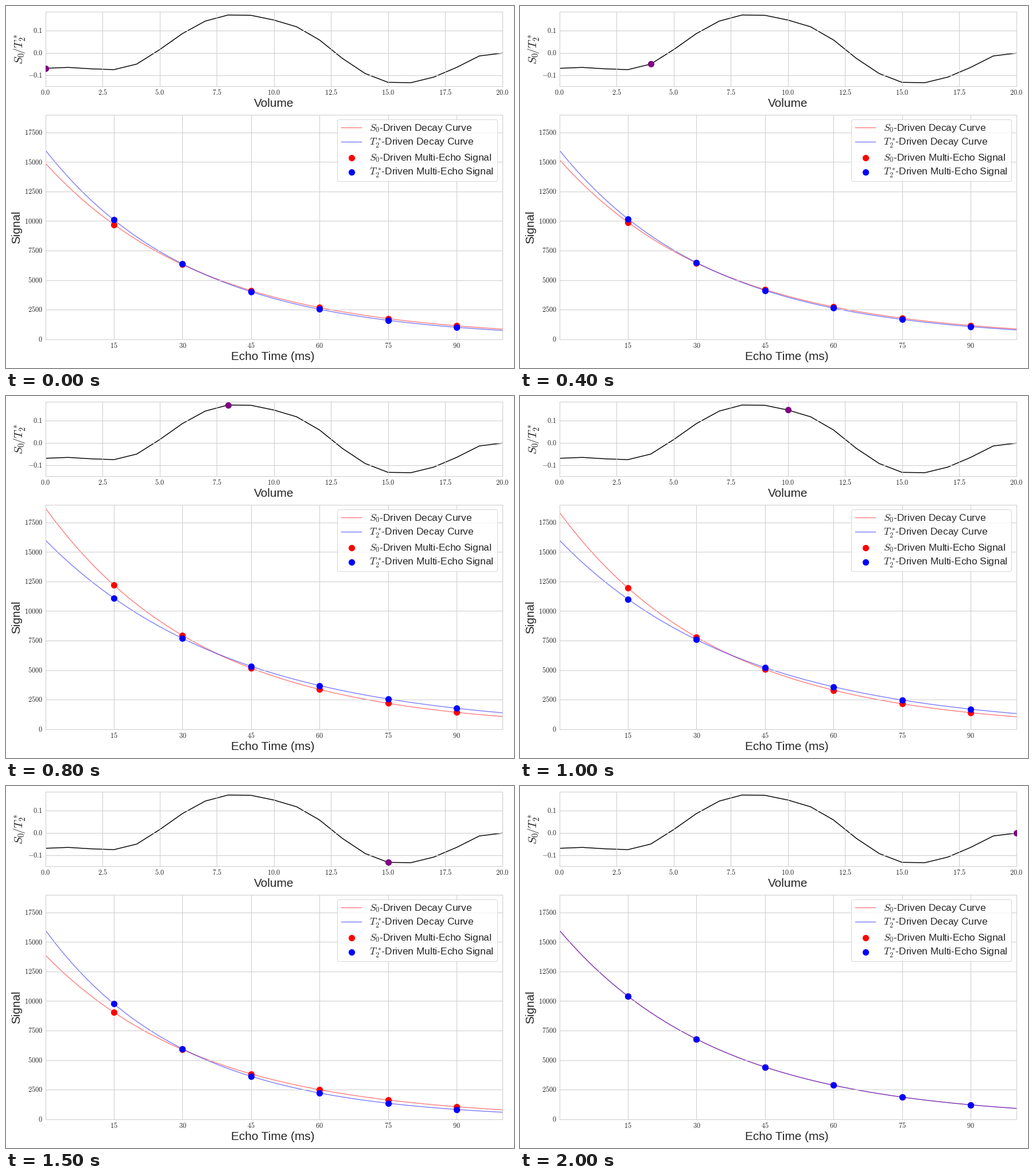
Recreate the animation shown at these times as a matplotlib script. Size 885 by 632 pixels, loop 2.1 s.

```python
import numpy as np
import matplotlib.pyplot as plt
from matplotlib.animation import FuncAnimation
from matplotlib.patches import FancyBboxPatch

plt.rcParams.update({
    "font.family": "Liberation Sans",
    "mathtext.fontset": "cm",
    "axes.axisbelow": True,
})

W, H = 885, 632
LEFT, RIGHT = 68.6, 864.6
GRAY, INK = "0.8", "0.15"
TICK, LEGEND, LABEL = 12.2, 17.28, 20.8  # font sizes, 1 pt = 1 px
LINE, DOT = 1.45, 11.2
S0, T2 = 16000, 35

echo_times = np.arange(15, 91, 15)
times = np.linspace(0, 100, 201)
volumes = np.arange(21)
change = np.array([
    -0.0690, -0.0650, -0.0713, -0.0750, -0.0500, 0.0146, 0.0868,
    0.1428, 0.1700, 0.1685, 0.1475, 0.1170, 0.0580, -0.0245,
    -0.0925, -0.1320, -0.1335, -0.1085, -0.0650, -0.0135, -0.0010,
])

fig = plt.figure(figsize=(W / 72, H / 72), dpi=72, facecolor="white")

# Pixel-based layer for labels and legend
layer = fig.add_axes([0, 0, 1, 1], zorder=5)
layer.set(xlim=(0, W), ylim=(H, 0))
layer.axis("off")


def put(x, y, text, size, ha="center", rotation=0):
    layer.text(x, y, text, size=size, color=INK, ha=ha, va="baseline",
               rotation=rotation, rotation_mode="anchor")


def make_axes(top, bottom, xlim, ylim, xticks, yticks, fmt):
    ax = fig.add_axes([LEFT / W, 1 - bottom / H, (RIGHT - LEFT) / W, (bottom - top) / H])
    ax.set(xlim=xlim, ylim=ylim, xticks=xticks, yticks=yticks)
    ax.tick_params(length=0, labelbottom=False, labelleft=False)
    ax.grid(color=GRAY, lw=1)
    for spine in ax.spines.values():
        spine.set(color=GRAY, linewidth=1)
    for v in xticks:
        x = np.interp(v, xlim, (LEFT, RIGHT))
        put(x, bottom + 15.3, f"${v:{fmt}}$", TICK)
    for v in yticks:
        y = np.interp(v, ylim, (bottom, top))
        put(63.7, y + 4.2, f"${v:{fmt}}$", TICK, ha="right")
    return ax


pad = 0.05 * np.ptp(change)
ax_ts = make_axes(9.8, 139.8, (0, 20), (change.min() - pad, change.max() + pad),
                  np.arange(0, 20.1, 2.5), [-0.1, 0.0, 0.1], ".1f")
ax_sig = make_axes(189.8, 581.8, (0, 100), (0, 19000),
                   echo_times, np.arange(0, 17501, 2500), ".0f")

put(467, 175.8, "Volume", LABEL)
put(465.2, 617.5, "Echo Time (ms)", LABEL)
put(29.6, 74.8, r"$S_0\!/T_2^*$", LABEL, rotation=90)
put(24.5, 386, "Signal", LABEL, rotation=90)

# Legend
layer.add_patch(FancyBboxPatch((577.5, 198.5), 279, 108,
                               boxstyle="round,pad=0,rounding_size=3.5",
                               fc=(1, 1, 1, 0.8), ec=(0.8, 0.8, 0.8, 0.8), lw=1))
names = {"red": r"$S_0$", "blue": r"$T_2^*\!$"}
for y, color in [(212, "red"), (237.4, "blue")]:
    layer.plot([584.3, 618.9], [y, y], color=color, alpha=0.5, lw=LINE)
    put(632.6, y + 5.7, f"{names[color]}-Driven Decay Curve", LEGEND, ha="left")
for y, color in [(265.3, "red"), (290.4, "blue")]:
    layer.scatter([601.6], [y], s=DOT**2, color=color, lw=0)
    put(632.6, y + 4.5, f"{names[color]}-Driven Multi-Echo Signal", LEGEND, ha="left")

# Time series and decay curves
ax_ts.plot(volumes, change, color="black", lw=LINE, zorder=0)
marker = ax_ts.scatter([0], [0], s=DOT**2, color="purple", lw=0, zorder=3)


def decay_pair(color):
    line, = ax_sig.plot([], [], color=color, alpha=0.5, lw=LINE, zorder=0)
    dots = ax_sig.scatter(echo_times, echo_times, s=DOT**2, color=color, lw=0, zorder=1)
    return line, dots


def set_decay(pair, s0, t2):
    line, dots = pair
    line.set_data(times, s0 * np.exp(-times / t2))
    dots.set_offsets(np.column_stack([echo_times, s0 * np.exp(-echo_times / t2)]))


s0_pair, t2_pair = decay_pair("red"), decay_pair("blue")


def update(i):
    scale = 1 + change[i]
    marker.set_offsets([[volumes[i], change[i]]])
    set_decay(s0_pair, S0 * scale, T2)
    set_decay(t2_pair, S0, T2 * scale)
    return [marker, *s0_pair, *t2_pair]


anim = FuncAnimation(fig, update, frames=len(volumes), interval=100, repeat=True)
plt.show()
```
